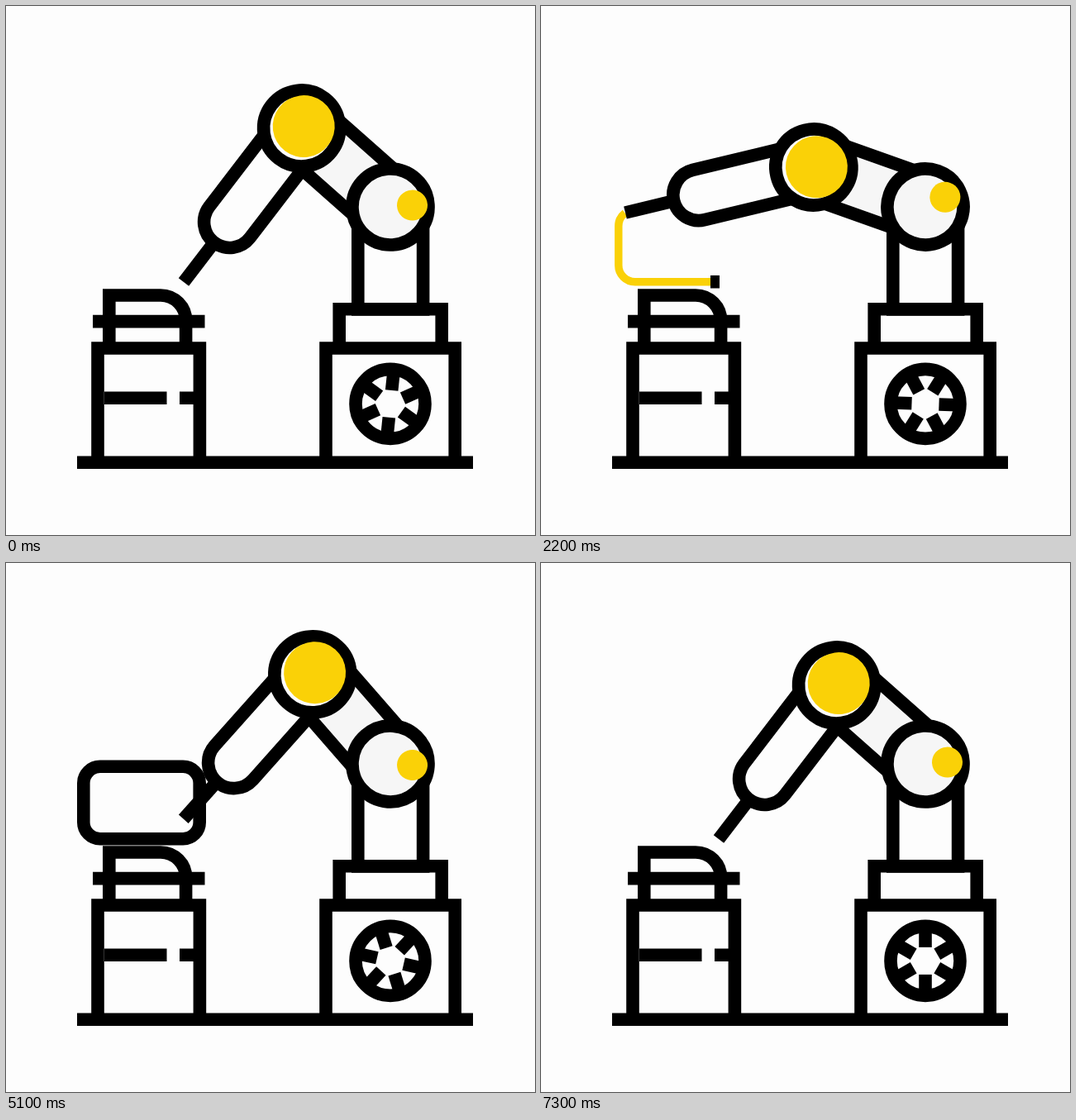
These frames come from a looping animation (640x640 px, 7400 ms). An HTML page:

```html
<!DOCTYPE html>
<html lang="en">
<head>
<meta charset="utf-8">
<title>Robot arm</title>
<style>
  html, body { margin: 0; width: 100%; height: 100%; overflow: hidden; background: #fdfdfd; }
  svg { display: block; width: 100vw; height: 100vh; }
  .line { fill: none; stroke: #000; stroke-width: 15.6; }
  .paper { fill: #fdfdfd; }
  .pale { fill: #f6f6f6; }
  .gold { fill: #fad107; }
</style>
</head>
<body>
<svg viewBox="0 0 640 640">
  <defs>
    <path id="frame" d="M216 333.7H113.8a20 20 0 0 1-20-20V266.3a20 20 0 0 1 20-20H214.2a20 20 0 0 1 20 20V313.7a20 20 0 0 1-20 20"/>
  </defs>

  <g class="line">
    <path d="M86 552.3H565"/>
    <path d="M111 552V414H234.4V552M119 474.2H194.5M210 474.2H227"/>
    <path d="M124.8 414V350H187A30.6 30.6 0 0 1 217.6 381V414M105 381.6H240.5"/>
    <path d="M387 552V414H543.2V552M403.2 414V366.8H527.2V414"/>
    <path d="M425.8 243V367H504.6V243"/>
    <circle cx="465" cy="481.4" r="42"/>
    <g id="fan"></g>
  </g>

  <g id="screen">
    <use id="trace" href="#frame" fill="none" stroke="#fad107" stroke-width="9.4"/>
    <use id="outline" href="#frame" class="line"/>
    <path id="play" d="M151 273V307L177 290Z" stroke="#000" stroke-width="9" stroke-linejoin="round"/>
  </g>

  <g id="upper">
    <path class="pale" d="M0-37H143.4V37H0Z"/>
    <path class="line" d="M0-37H143.4M0 37H143.4"/>
    <circle class="line pale" style="fill:#f6f6f6" r="46"/>
    <circle class="gold" cx="-18.6" cy="19" r="18.5"/>
  </g>
  <g id="fore">
    <path class="line" style="fill:#fdfdfd" d="M0-31H143A31 31 0 0 1 143 31H0"/>
    <path class="line" d="M172 0H234.4"/>
    <circle class="line" style="fill:#fdfdfd" r="46"/>
    <circle class="gold" cx="-3.5" cy="-.6" r="37.5"/>
  </g>
  <g id="sparks"></g>
</svg>

<script>
const LOOP = 7400, STEP = 100;
const SHOULDER = { x: 465, y: 243 }, UPPER = 143.4, FORE = 234.4;
const $ = id => document.getElementById(id);
const clamp = v => Math.min(1, Math.max(0, v));
const deg = rad => rad * 180 / Math.PI;

// Smooth curve through [time, value] points that never overshoots them.
function curve(points) {
  const slope = i => (points[i + 1][1] - points[i][1]) / (points[i + 1][0] - points[i][0]);
  const tangent = points.map((_, i) => {
    if (i === 0 || i === points.length - 1) return 0;
    const a = slope(i - 1), b = slope(i);
    return a * b > 0 ? 2 * a * b / (a + b) : 0;
  });
  return t => {
    if (t <= points[0][0]) return points[0][1];
    const i = points.findIndex(p => p[0] > t) - 1;
    if (i < 0) return points[points.length - 1][1];
    const [t0, v0] = points[i], [t1, v1] = points[i + 1];
    const h = t1 - t0, s = (t - t0) / h, r = 1 - s;
    return v0 * (1 + 2 * s) * r * r + v1 * (3 - 2 * s) * s * s
      + h * s * r * (tangent[i] * r - tangent[i + 1] * s);
  };
}

const tipPath = [
  [750, 215, 334], [1400, 121, 332], [1600, 110, 331], [1900, 95, 290],
  [2200, 102, 250], [2400, 116, 246], [2850, 171, 246], [3300, 228, 257],
  [3500, 234, 275], [4000, 230, 335], [4800, 230, 335], [5500, 183, 271],
  [5800, 173, 277], [6300, 173, 277], [7000, 215, 334]
];
const tipX = curve(tipPath.map(p => [p[0], p[1]]));
const tipY = curve(tipPath.map(p => [p[0], p[2]]));
const traceLength = curve([[750, 0], [1400, 98], [1600, 108], [1900, 157], [2200, 199],
  [2400, 215], [2850, 271], [3300, 328], [4000, 424]]);
const outlineLength = curve([[2120, 0], [2200, 11], [3200, 215], [3300, 235],
  [4200, 385], [4700, 424]]);

// Each chip: final sideways drift, vertical offset, colour.
const GOLD = '#fad107', BLACK = '#000';
const bursts = [
  { at: 800, x: 215, y: 334, chips: [[-62, 2, BLACK], [-45, 2, GOLD], [52, 5, BLACK]] },
  { at: 4050, x: 230, y: 335, chips: [[34, -4, GOLD], [31, 2, BLACK], [-82, -1, BLACK]] },
  { at: 5720, x: 173, y: 277, chips: [[-51, -4, GOLD], [-56, 0, BLACK], [-16, 0, BLACK]] },
  { at: 6400, x: 164, y: 334, chips: [[-60, 0, BLACK], [-45, 0, GOLD], [50, 0, BLACK]] }
];

function add(parent, tag, attrs) {
  const node = document.createElementNS('http://www.w3.org/2000/svg', tag);
  for (const key in attrs) node.setAttribute(key, attrs[key]);
  return parent.appendChild(node);
}

for (let i = 0; i < 6; i++) {
  add($('fan'), 'path', { d: 'M0-38V-16.5', transform: `rotate(${i * 60})` });
}
for (const burst of bursts) {
  burst.nodes = burst.chips.map(chip =>
    add($('sparks'), 'rect', { width: 16, height: 16, fill: chip[2] }));
}

// Three turns with a short ramp at both ends.
function fanAngle(t) {
  const u = (t + 100) % LOOP, ramp = 127, speed = 1080 / (LOOP - ramp);
  if (u < ramp) return speed * u * u / (2 * ramp);
  if (u > LOOP - ramp) return 1080 - speed * (LOOP - u) ** 2 / (2 * ramp);
  return speed * (u - ramp / 2);
}

function place(node, x, y, angle) {
  node.setAttribute('transform', `translate(${x} ${y}) rotate(${angle})`);
}

function drawArm(t) {
  const x = tipX(t), y = tipY(t);
  const dx = x - SHOULDER.x, dy = y - SHOULDER.y, reach = Math.hypot(dx, dy);
  const bend = Math.acos((UPPER ** 2 + reach ** 2 - FORE ** 2) / (2 * UPPER * reach));
  const angle = Math.atan2(dy, dx) + bend;
  const ex = SHOULDER.x + UPPER * Math.cos(angle);
  const ey = SHOULDER.y + UPPER * Math.sin(angle);
  place($('upper'), SHOULDER.x, SHOULDER.y, deg(angle));
  place($('fore'), ex, ey, deg(Math.atan2(y - ey, x - ex)));
}

function drawScreen(t) {
  const lift = clamp((t - 6450) / 500);
  $('trace').setAttribute('stroke-dasharray', `${traceLength(t)} 999`);
  $('outline').setAttribute('stroke-dasharray', `${outlineLength(t)} 999`);
  const size = clamp((t - 5680) / 100);
  $('play').setAttribute('transform', `translate(164 290) scale(${size}) translate(-164 -290)`);
  $('play').setAttribute('visibility', size > 0 ? 'inherit' : 'hidden');
  $('screen').setAttribute('transform', `translate(0 ${-400 * lift * lift})`);
  $('screen').setAttribute('visibility', lift < 1 ? 'visible' : 'hidden');
}

function drawSparks(t) {
  for (const { at, x, y, chips, nodes } of bursts) {
    const age = t - at, drift = 1 - Math.exp(-age / 170);
    const fall = 0.19 * age + 0.00007 * age * age;
    const alpha = age > 0 ? clamp((850 - age) / 350) : 0;
    chips.forEach(([dx, dy], i) => {
      nodes[i].setAttribute('opacity', alpha);
      if (!alpha) return;
      nodes[i].setAttribute('x', x + dx * drift - 8);
      nodes[i].setAttribute('y', y + dy + fall - 8);
    });
  }
}

function draw(t) {
  place($('fan'), 465, 481.4, fanAngle(t));
  drawArm(t);
  drawScreen(t);
  drawSparks(t);
}

const start = performance.now();
function tick() {
  const t = (performance.now() - start) % LOOP;
  draw(Math.floor(t / STEP) * STEP);
  requestAnimationFrame(tick);
}
tick();
</script>
</body>
</html>
```
